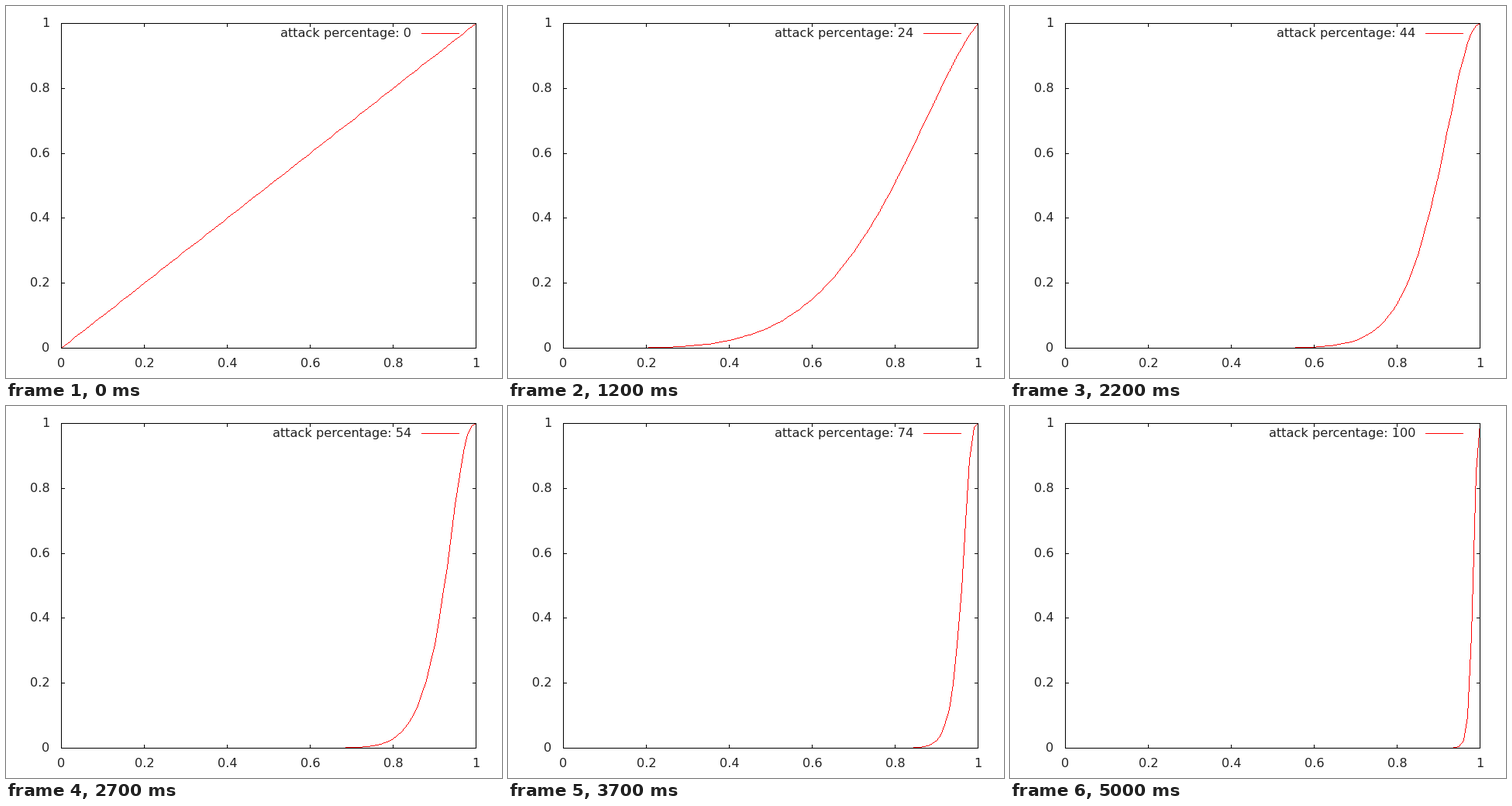
Animation, 640 px wide and 480 px high, one loop 5.1 s. Source, as a matplotlib script:

```python
import matplotlib.pyplot as plt
import numpy as np
from matplotlib.animation import FuncAnimation
from matplotlib.collections import PolyCollection
from matplotlib.patches import Rectangle

W, H, DPI = 640, 480, 100
LEFT, RIGHT, TOP, BOTTOM = 71, 606, 22, 441
STEPS, INTERVAL = 51, 100
TICK = 5
FONT = dict(family="DejaVu Sans", size=16.1 * 72 / DPI, color="#222222",
            va="baseline")

# Curve family y = 1 - (1 - q x^a)^b, scaled to end at 1.
PERCENT = [0, 10, 24, 44, 64, 84, 100]
LOG_A = np.log([1, 2, 4.62, 13.2, 34.5, 75, 137])
LOG_B = np.log([2, 2, 2, 3.03, 4.8, 6.2, 7.1])
Q = [1e-6, 0.33, 0.8, 0.9, 0.92, 0.93, 0.93]

fig = plt.figure(figsize=(W / DPI, H / DPI), dpi=DPI, facecolor="white")
ax = fig.add_axes([0, 0, 1, 1])
ax.set_xlim(0, W)
ax.set_ylim(H, 0)
ax.axis("off")


def to_px(x, y):
    px = LEFT + np.rint((RIGHT - LEFT) * np.asarray(x))
    py = BOTTOM - np.rint((BOTTOM - TOP) * np.asarray(y))
    return px, py


def block(x, y, w, h, color="black", z=3):
    ax.add_patch(Rectangle((x, y), w, h, facecolor=color, edgecolor="none",
                           linewidth=0, antialiased=False, snap=False, zorder=z))


def draw_frame():
    width, height = RIGHT - LEFT + 1, BOTTOM - TOP + 1
    for y in (TOP, BOTTOM):
        block(LEFT, y, width, 1)
    for x in (LEFT, RIGHT):
        block(x, TOP, 1, height)
    for k in range(6):
        v = k / 5
        px, py = to_px(v, v)
        block(px, TOP, 1, TICK)
        block(px, BOTTOM - TICK + 1, 1, TICK)
        block(LEFT, py, TICK, 1)
        block(RIGHT - TICK + 1, py, TICK, 1)
        ax.text(px + 0.5, BOTTOM + 25, f"{v:g}", ha="center", **FONT)
        ax.text(56.5, py + 5, f"{v:g}", ha="right", **FONT)


def curve(percent):
    a = np.exp(np.interp(percent, PERCENT, LOG_A))
    b = np.exp(np.interp(percent, PERCENT, LOG_B))
    q = np.interp(percent, PERCENT, Q)
    x = np.linspace(0, 1, 101)
    y = 1 - (1 - q * x**a) ** b
    return to_px(x, y / y[-1])


def rasterize(xs, ys):
    """Unit squares along a one-pixel-wide polyline."""
    points = []
    for x0, y0, x1, y1 in zip(xs, ys, xs[1:], ys[1:]):
        n = int(max(abs(x1 - x0), abs(y1 - y0))) + 1
        points.append(np.column_stack([np.linspace(x0, x1, n),
                                       np.linspace(y0, y1, n)]))
    cells = np.unique(np.rint(np.vstack(points)), axis=0)
    corners = np.array([[0, 0], [1, 0], [1, 1], [0, 1]])
    return cells[:, None, :] + corners


draw_frame()
block(536, 35, 49, 1, "red", 2)
label = ax.text(523, 40, "", ha="right", **FONT)
line = PolyCollection([], facecolors="red", edgecolors="none", linewidths=0,
                      antialiaseds=False, snap=False, zorder=2)
ax.add_collection(line, autolim=False)


def update(i):
    percent = 2 * i
    line.set_verts(rasterize(*curve(percent)))
    label.set_text(f"attack percentage: {percent}")
    return line, label


anim = FuncAnimation(fig, update, frames=STEPS, interval=INTERVAL,
                     repeat=True, repeat_delay=0, blit=False)
plt.show()
```
